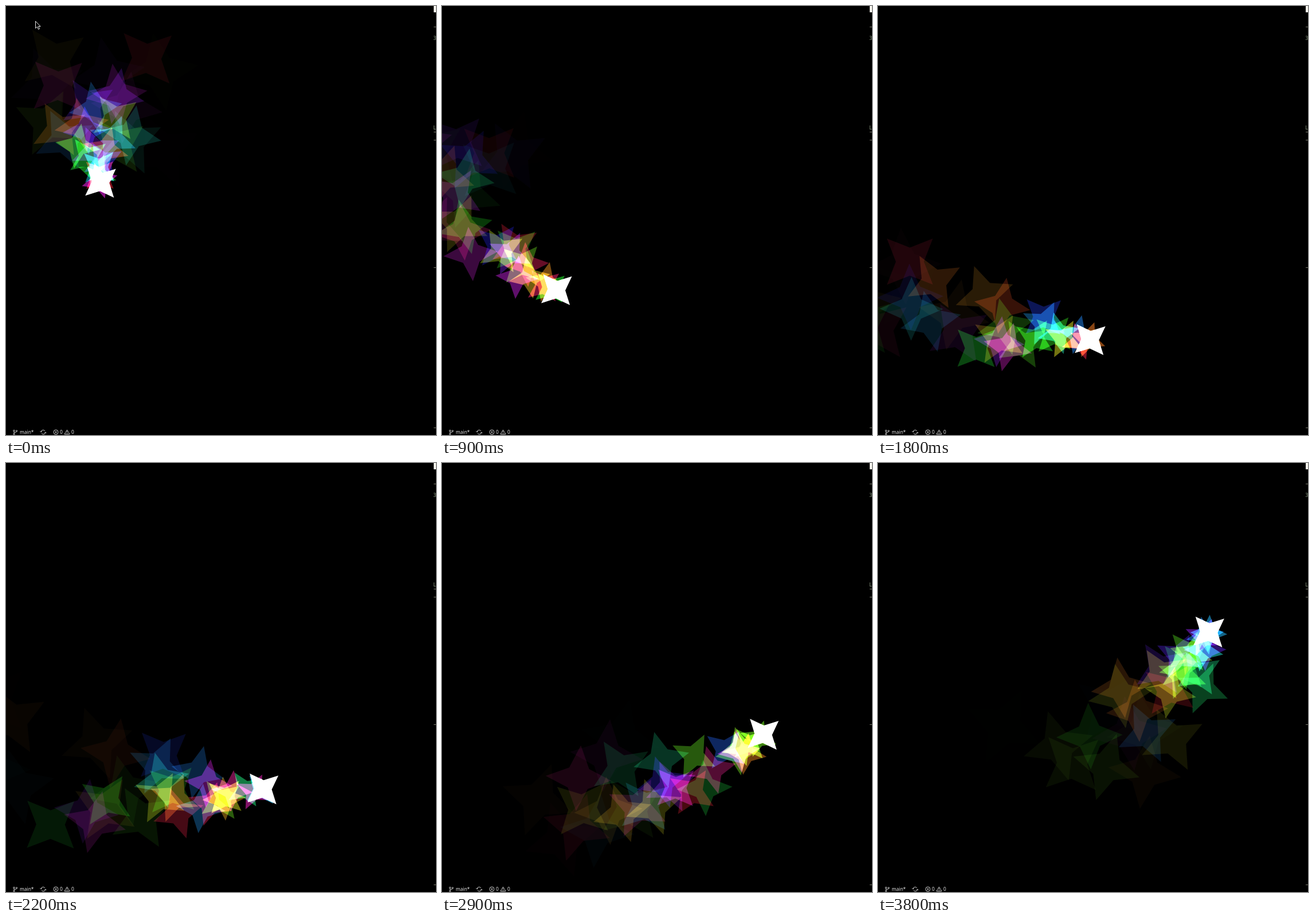
Animation of 750x747 px, one loop 3900 ms. Source, as an HTML page with a canvas:

```html
<!DOCTYPE html>
<html lang="en">
<head>
<meta charset="utf-8">
<title>Star trail</title>
<style>
  html, body { margin: 0; width: 100%; height: 100%; overflow: hidden; background: #000; }
  canvas, svg { position: absolute; left: 0; top: 0; }
  text { font: 8.4px "Noto Sans", "Open Sans", sans-serif; fill: #e4e4e4; }
  .edge text { font: 9px "Noto Sans Mono", monospace; fill: #8a9a80; }
</style>
</head>
<body>
<canvas id="sky" width="750" height="747"></canvas>
<svg width="750" height="747" fill="none" stroke="#d8d8d8" stroke-width=".9">
  <path d="M14 740v5M14 743q4 0 4-2"/>
  <circle cx="14" cy="739.5" r="1.2"/><circle cx="18.5" cy="740" r="1.2"/><circle cx="14" cy="745.5" r="1"/>
  <path d="M61 741a4 4 0 0 1 7-1M69 743a4 4 0 0 1-7 1M59.5 740.5l1.5 1.5 2-1.5M67 743.5l2-1.5 1.5 1.5"/>
  <circle cx="87" cy="742" r="4"/>
  <path d="M85.3 740.3l3.4 3.4M88.7 740.3l-3.4 3.4M106.5 738l4.5 7.5h-9zM106.5 740.5v2.5M106.5 744v.8"/>
  <g stroke="none">
    <text x="24" y="745">main*</text><text x="94" y="745">0</text><text x="114" y="745">0</text>
    <path fill="#f4f2ea" d="M746 0h4v11h-4z"/>
    <g class="edge"><text x="745" y="59">3</text><text x="745" y="215">L</text></g>
  </g>
  <path stroke="#77776a" stroke-width="1" d="M746 36.5h4M746 219.5h4M746 233.5h4M746 455.5h4M746 734.5h4"/>
  <path id="cursor" fill="#000" stroke="#fff" d="M0 0V12.3L2.9 9.7 5 14.2 7 13.2 5 9H8.6z"/>
</svg>
<script>
const LOOP = 3900, STEP = 100, LIFE = 1250, SPACING = 40, TAU = Math.PI * 2;
const ctx = document.getElementById('sky').getContext('2d');
const cursor = document.getElementById('cursor');

let seed = 41;
function rand(min, max) {
  seed = (seed * 16807) % 2147483647;
  return min + (max - min) * seed / 2147483647;
}

function lerpKeys(keys, t) {
  let i = 0;
  while (i < keys.length - 2 && t > keys[i + 1][0]) i++;
  const [t0, a] = keys[i], [t1, b] = keys[i + 1];
  return a + (b - a) * (t - t0) / (t1 - t0);
}

// The leading star runs along a circle: degrees by time.
const orbit = [[0, 195.6], [500, 167.2], [1300, 119.4], [1800, 90.8],
               [2600, 48.4], [3300, 5], [3800, -19.1]];
function head(t) {
  const a = lerpKeys(orbit, t) * TAU / 360;
  return [373 + 216 * Math.cos(a), 365 + 216 * Math.sin(a)];
}

// Trail stars leave the head, drift to the left and scatter.
const stars = [];
for (let born = -LIFE; born < LOOP; born += SPACING) {
  const [x, y] = head(born);
  stars.push({ born, x, y, vx: rand(-310, -40), vy: rand(-110, 110),
               angle: rand(0, TAU), hue: rand(0, 360) });
}

function drawStar(x, y, size, angle) {
  ctx.beginPath();
  for (let i = 0; i < 8; i++) {
    const r = i % 2 ? size * 0.43 : size, a = angle + i * TAU / 8;
    ctx.lineTo(x + r * Math.cos(a), y + r * Math.sin(a));
  }
  ctx.fill();
}

function draw(t) {
  ctx.globalCompositeOperation = 'source-over';
  ctx.globalAlpha = 1;
  ctx.fillStyle = '#000';
  ctx.fillRect(0, 0, 750, 747);

  ctx.globalCompositeOperation = 'lighter';
  for (const s of stars) {
    const age = (t - s.born) / LIFE;
    if (age < 0 || age >= 1) continue;
    ctx.globalAlpha = 0.68 * (1 - age) ** 1.5;
    ctx.fillStyle = `hsl(${s.hue} 75% 45%)`;
    drawStar(s.x + s.vx * age, s.y + s.vy * age, 32 + 38 * age, s.angle);
  }

  ctx.globalAlpha = 1;
  ctx.fillStyle = '#fff';
  drawStar(...head(t), 35.5, -0.716);

  const cx = lerpKeys([[0, 51.5], [600, 50.5], [800, 14]], t);
  const cy = lerpKeys([[0, 26.5], [500, 30.5], [600, 30.5], [800, 9.5]], t);
  cursor.setAttribute('transform', `translate(${cx} ${cy})`);
  cursor.setAttribute('visibility', t > 800 ? 'hidden' : 'visible');
}

const start = performance.now();
function tick() {
  const t = (performance.now() - start) % LOOP;
  draw(Math.floor(t / STEP) * STEP);
  requestAnimationFrame(tick);
}
tick();
</script>
</body>
</html>
```
